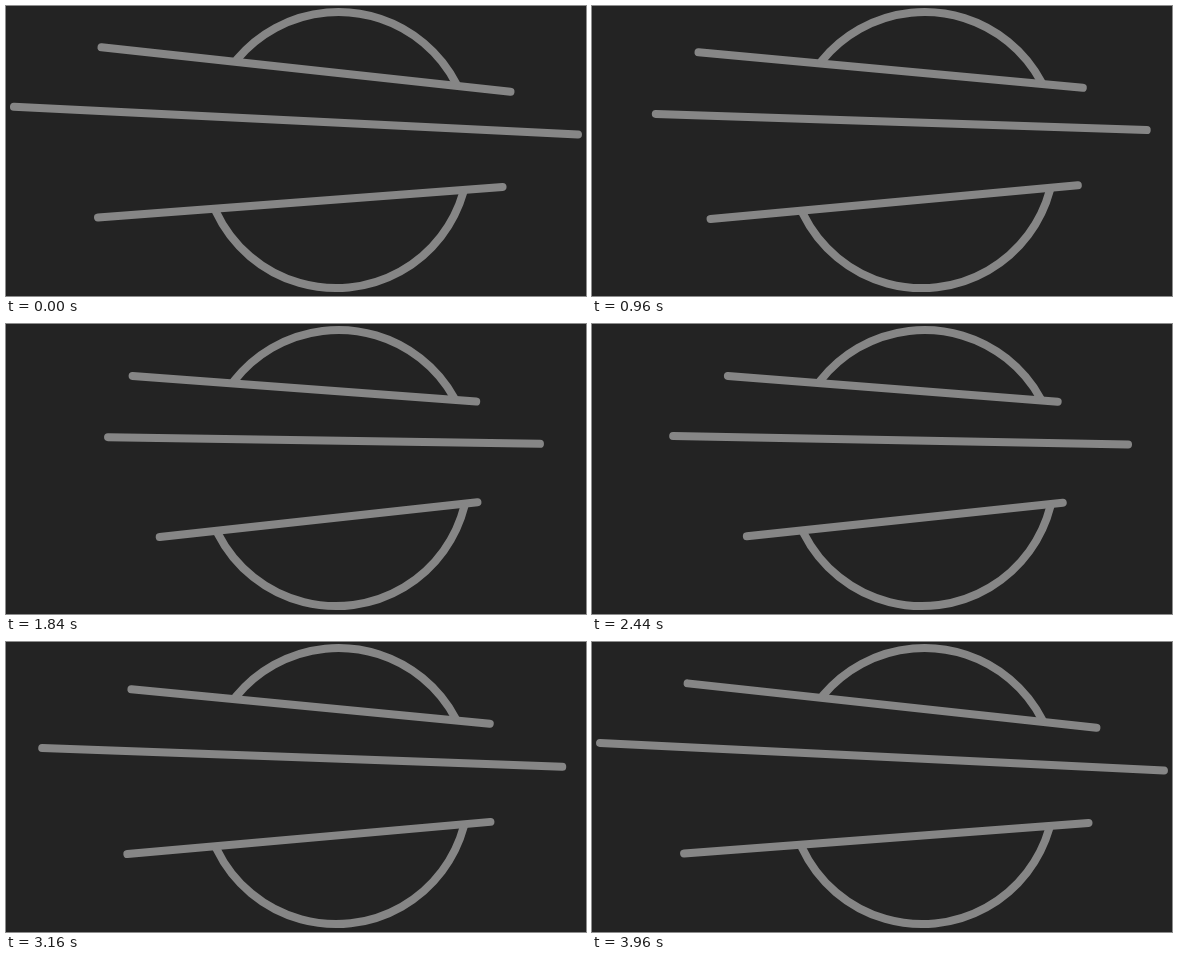
These frames come from a looping animation (580 by 290 pixels, 4 s). An HTML page with a canvas:

```html
<!DOCTYPE html>
<html lang="en">
<head>
<meta charset="utf-8">
<title>Swaying lines</title>
<style>
  html, body { margin: 0; width: 100%; height: 100%; overflow: hidden; background: #232323; }
  canvas { display: block; }
</style>
</head>
<body>
<canvas id="stage" width="580" height="290"></canvas>
<script>
const ctx = document.getElementById('stage').getContext('2d');
const LOOP = 4000, STEP = 40, SWAY = -1.95, RADIUS = 132.5;
const rad = deg => deg * Math.PI / 180;

// Each bar lies at a signed distance from its pivot; its two ends
// shorten by `trim` and are shortest at the time `peak`.
const pieces = [
  { x: 332.5, y: 138.5, dist: -71, angle: 6.2, arc: [220, 333],
    left: { reach: 246.1, trim: 44.2, peak: 2680 },
    right: { reach: 165.3, trim: 37.3, peak: 2400 } },
  { x: 331, y: 144.7, dist: -28, angle: 2.8,
    left: { reach: 324.8, trim: 96, peak: 1724 },
    right: { reach: 239.9, trim: 38.6, peak: 2080 } },
  { x: 330, y: 149.6, dist: 43.8, angle: -4.33, arc: [16, 155],
    left: { reach: 242, trim: 64, peak: 2200 },
    right: { reach: 163.7, trim: 28, peak: 2200 } }
];

// Eased rise from 0 to 1 at `peak`, then back to 0 at the end of the loop.
function swing(t, peak) {
  const phase = t < peak ? t / peak : (LOOP - t) / (LOOP - peak);
  return (1 - Math.cos(Math.PI * phase)) / 2;
}

const reachAt = (end, t) => end.reach - end.trim * swing(t, end.peak);

function drawPiece(piece, t) {
  const turn = SWAY * swing(t, LOOP / 2);
  ctx.save();
  ctx.translate(piece.x, piece.y);
  ctx.rotate(rad(piece.angle + turn));
  ctx.beginPath();
  ctx.moveTo(-reachAt(piece.left, t), piece.dist);
  ctx.lineTo(reachAt(piece.right, t), piece.dist);
  ctx.stroke();
  if (piece.arc) {
    const [from, to] = piece.arc.map(a => rad(a - piece.angle));
    ctx.beginPath();
    ctx.arc(0, 0, RADIUS, from, to);
    ctx.stroke();
  }
  ctx.restore();
}

function draw(now) {
  const t = Math.floor((now % LOOP) / STEP) * STEP;
  ctx.fillStyle = '#232323';
  ctx.fillRect(0, 0, 580, 290);
  ctx.strokeStyle = '#868686';
  ctx.lineWidth = 8;
  ctx.lineCap = 'round';
  pieces.forEach(piece => drawPiece(piece, t));
}

let start;
function tick(now) {
  start ??= now;
  draw(now - start);
  requestAnimationFrame(tick);
}
draw(0);
requestAnimationFrame(tick);
</script>
</body>
</html>
```
